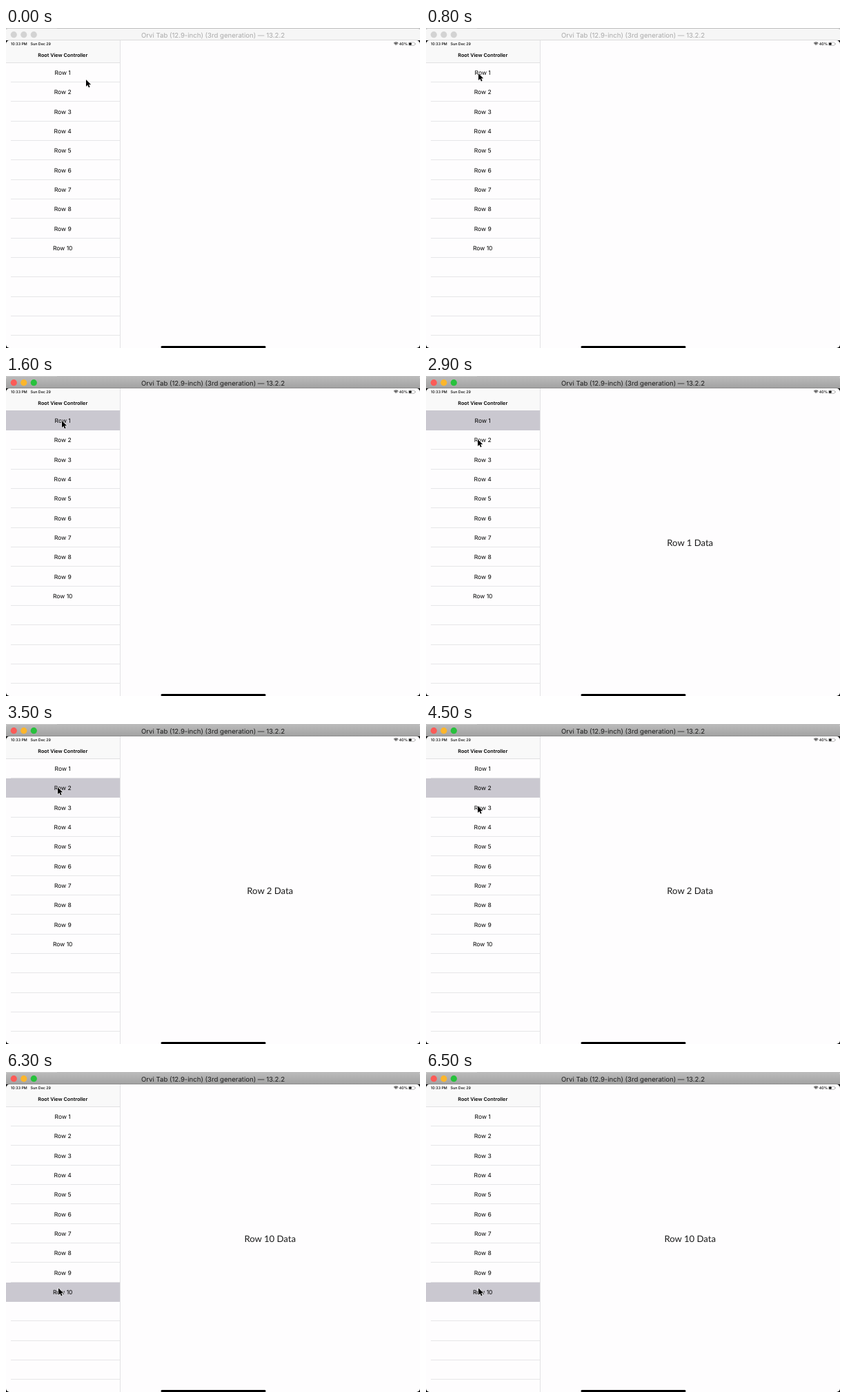
Recreate the animation shown at these times as an HTML page with a canvas. Size 600 by 465 pixels, loop 7 s.

```html
<!DOCTYPE html>
<html lang="en">
<head>
<meta charset="utf-8">
<title>Split view</title>
<style>
  html, body { margin: 0; width: 100%; height: 100%; overflow: hidden; background: #fff; }
  canvas { display: block; width: 600px; height: 465px; }
</style>
</head>
<body>
<canvas id="stage" width="600" height="465"></canvas>
<script>
const ctx = document.getElementById('stage').getContext('2d');
const W = 600, H = 465, LOOP = 7000, STEP = 100;
const BAR = 18, SIDE = 165, LIST_TOP = 50.5, ROW_H = 28.35;
const UI = 'Inter, "Liberation Sans", sans-serif';

const home = { x: 116, y: 75 };
const moves = [
  { from: 100, to: 300, x: 122, y: 99 },
  { from: 300, to: 600, x: 63, y: 62 },
  { from: 600, to: 800, x: 76, y: 66 },
  { from: 800, to: 1100, x: 124, y: 103 },
  { from: 1100, to: 1300, x: 81, y: 65 },
  { from: 2400, to: 2900, x: 75, y: 92 },
  { from: 4100, to: 4500, x: 75, y: 119 },
  { from: 5000, to: 5300, x: 96, y: 288 },
  { from: 5300, to: 5700, x: 76, y: 314 }
];
const taps = [
  { at: 1600, row: 1 }, { at: 3500, row: 2 }, { at: 4800, row: 3 }, { at: 6300, row: 10 }
];
const DETAIL_READY = 1900;

const ease = u => u * u * (3 - 2 * u);
const rowEdge = i => Math.round(LIST_TOP + i * ROW_H);

function pointerAt(t) {
  const now = Math.floor(t / STEP) * STEP;
  let { x, y } = home;
  for (const m of moves) {
    if (now < m.from) break;
    const k = ease(Math.min(1, (now - m.from) / (m.to - m.from)));
    x += (m.x - x) * k;
    y += (m.y - y) * k;
  }
  return { x, y };
}

function selectedAt(t) {
  const done = taps.filter(tap => tap.at <= t);
  return done.length ? done[done.length - 1].row : 0;
}

function rect(x, y, w, h, fill) {
  ctx.fillStyle = fill;
  ctx.fillRect(x, y, w, h);
}

function rounded(x, y, w, h, r, fill) {
  ctx.fillStyle = fill;
  ctx.beginPath();
  ctx.roundRect(x, y, w, h, r);
  ctx.fill();
}

function text(str, x, y, font, fill = '#000', align = 'center') {
  ctx.font = font;
  ctx.fillStyle = fill;
  ctx.textAlign = align;
  ctx.fillText(str, x, y);
}

function titleBar(active) {
  rect(0, 0, W, 2, '#bdbdbd');
  rect(0, 0, 74, 1, '#cacaca');
  let fill = '#f6f6f6';
  if (active) {
    fill = ctx.createLinearGradient(0, 2, 0, BAR);
    fill.addColorStop(0, '#b9b9b9');
    fill.addColorStop(1, '#a1a1a1');
  }
  rounded(0, 1, W, BAR - 1, [3, 3, 0, 0], fill);
  rect(0, BAR - 1, W, 1, active ? '#8c8c8c' : '#dcdcdc');

  const colors = active ? ['#fc5b57', '#fdb62b', '#27c13c'] : Array(3).fill('#d3d3d3');
  colors.forEach((color, i) => {
    ctx.beginPath();
    ctx.arc(11.3 + i * 14.5, 9.7, 4.6, 0, 7);
    ctx.fillStyle = color;
    ctx.fill();
  });
  text('Orvi Tab (12.9-inch) (3rd generation) — 13.2.2', W / 2, 13.5,
    `9.6px ${UI}`, active ? '#1c1c1c' : '#a9a9a9');
}

function statusBar() {
  const font = `500 5.35px ${UI}`;
  text('10:33 PM', 7, 25, font, '#000', 'left');
  text('Sun Dec 29', 35.5, 25, font, '#000', 'left');
  text('40%', 582, 25, font, '#000', 'right');

  ctx.strokeStyle = '#111';
  ctx.lineWidth = 0.9;
  for (let r = 1.6; r < 5; r += 1.45) {
    ctx.beginPath();
    ctx.arc(565.2, 25.4, r, -Math.PI * 0.75, -Math.PI * 0.25);
    ctx.stroke();
  }
  ctx.lineWidth = 0.5;
  ctx.strokeStyle = '#888';
  ctx.beginPath();
  ctx.roundRect(583.3, 20.8, 9, 4.7, 1.4);
  ctx.stroke();
  rounded(584, 21.5, 3.7, 3.3, 0.8, '#111');
  rect(592.9, 22.4, 0.7, 1.5, '#888');
}

function sidebar(selected) {
  rect(0, BAR, SIDE, 32, '#f9f9f9');
  text('Root View Controller', 82.3, 42, `600 7.25px ${UI}`);
  rect(0, 50, SIDE, 1, '#e0e0e2');
  for (let i = 1; i <= 14; i++) rect(7, rowEdge(i) - 1, SIDE - 7, 1, '#e6e6e8');
  if (selected) {
    const top = selected === 1 ? 50 : rowEdge(selected - 1);
    rect(0, top, SIDE, rowEdge(selected) - top, '#cac8d0');
  }
  for (let i = 1; i <= 10; i++) {
    text('Row ' + i, 82.2, Math.round(LIST_TOP + (i - 0.5) * ROW_H + 3.2), `8.55px ${UI}`);
  }
  rect(SIDE, BAR, 1, H - BAR, '#e2e2e4');
}

// Black outside the rounded corners of the screen.
function corners() {
  ctx.fillStyle = '#000';
  ctx.beginPath();
  ctx.rect(0, BAR, W, H - BAR);
  ctx.roundRect(0, BAR, W, H - BAR, 5);
  ctx.fill('evenodd');
}

function pointer({ x, y }) {
  const arrow = new Path2D('M0 0V11L2.6 8.7L4.4 12.7L6.2 11.9L4.5 8H8Z');
  ctx.save();
  ctx.translate(x, y);
  ctx.scale(0.9, 0.9);
  ctx.lineJoin = 'round';
  ctx.lineWidth = 1.3;
  ctx.strokeStyle = '#fff';
  ctx.stroke(arrow);
  ctx.fillStyle = '#000';
  ctx.fill(arrow);
  ctx.restore();
}

function draw(t) {
  const row = selectedAt(t);
  rect(0, 0, W, H, '#fefdfe');
  sidebar(row);
  statusBar();
  if (t >= DETAIL_READY) text(`Row ${row} Data`, 382.7, 247, '13.1px Lato, sans-serif', '#1a1a1a');
  corners();
  rounded(224.5, 462, 152, 3, 1.5, '#000');
  titleBar(row > 0);
  pointer(pointerAt(t));
}

ctx.textRendering = 'geometricPrecision';
const begin = performance.now();
function frame() {
  draw((performance.now() - begin) % LOOP);
  requestAnimationFrame(frame);
}
frame();
</script>
</body>
</html>
```
